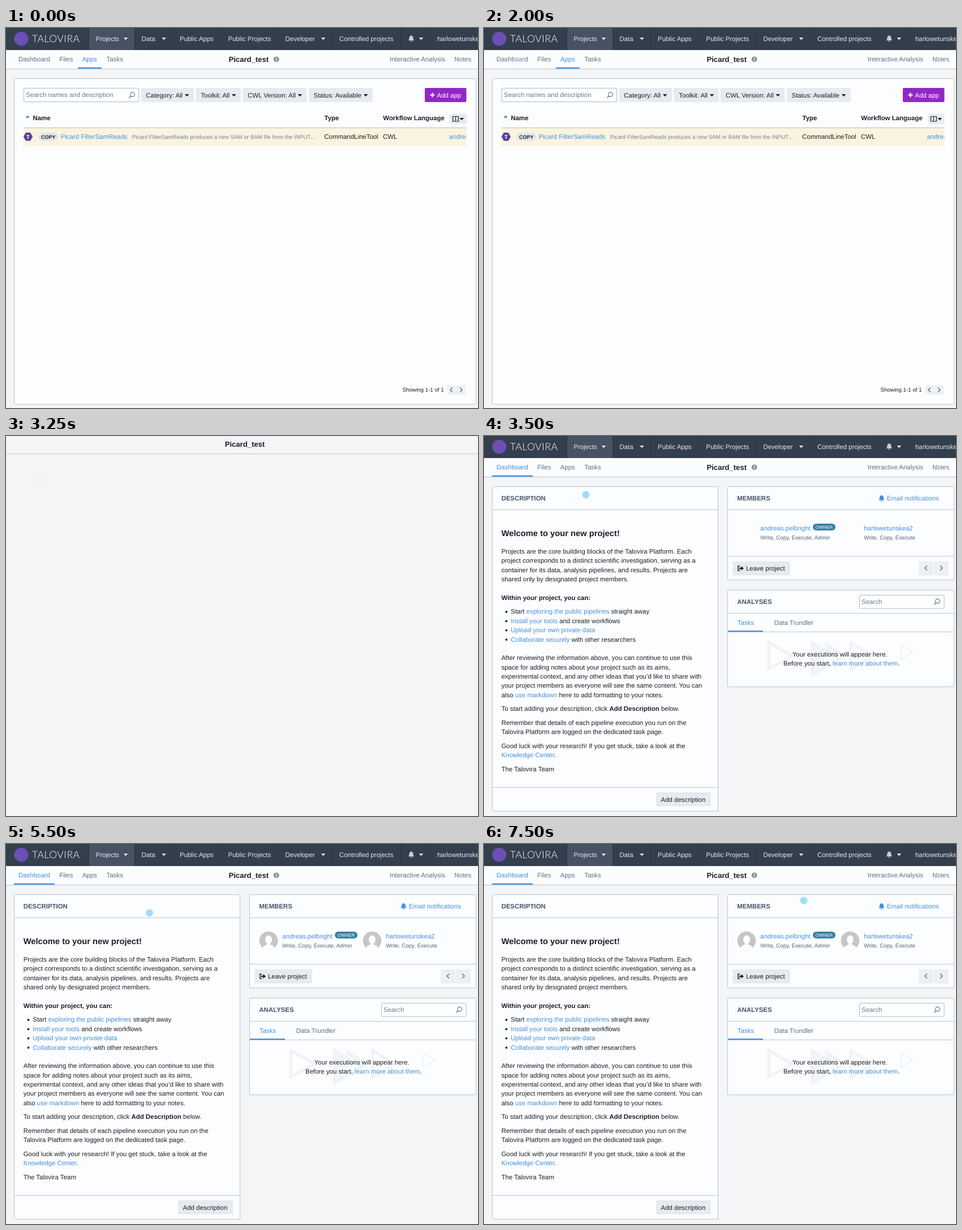
Recreate the animation shown at these times as an HTML page. Size 834x672 px, loop 8000 ms.

```html
<!DOCTYPE html>
<html lang="en">
<head>
<meta charset="utf-8">
<title>Project dashboard</title>
<style>
html, body { margin: 0; width: 100%; height: 100%; overflow: hidden; background: #f3f5f7; }
svg { display: block; width: 834px; height: 672px; }
text { font: 11.45px "Liberation Sans", Arial, sans-serif; fill: #1b1f26; text-rendering: geometricPrecision; white-space: pre; }
.b { font-weight: 700; }
.small { font-size: 9.75px; }
.title { font-size: 13.09px; font-weight: 700; }
.h1 { font-size: 14.73px; font-weight: 700; }
.head { font-weight: 700; fill: #45556a; }
.nav text { fill: #e6e9ed; }
.nav .brand { font: 300 17.6px Lato, sans-serif; letter-spacing: .5px; fill: #fff; }
.tab { fill: #5d7087; }
.link { fill: #4490e0; }
.hint { fill: #6c7885; }
.note { fill: #71809a; }
.white { fill: #fff; }
.card { fill: #fcfdfe; stroke: #b6c6d3; }
.field { fill: #fff; stroke: #a9bccb; }
.btn { fill: #e7ebef; }
.rule { stroke: #b6c6d3; fill: none; }
.bar { fill: #4f97e3; }
.chev { fill: none; stroke: #6f7b88; stroke-width: 1.7; }
.ghost { fill: none; stroke: #f0f3f6; stroke-width: 5; stroke-linejoin: round; }

#apps, #blank, #dash, #chrome, #faces, #dot, #ring { animation: 8s step-end infinite; }
#apps { animation-name: apps; }
#blank { animation-name: blank; }
#chrome { animation-name: chrome; }
#dash { animation-name: dash; }
#faces { animation-name: faces; }
#dot { animation-name: dot; }
#ring { animation-name: ring; }
@keyframes apps { 0% { visibility: visible } 40.625%, 100% { visibility: hidden } }
@keyframes blank { 0% { visibility: hidden } 40.625% { visibility: visible } 43.75%, 100% { visibility: hidden } }
@keyframes chrome { 0% { visibility: visible } 40.625% { visibility: hidden } 43.75%, 100% { visibility: visible } }
@keyframes dash { 0% { visibility: hidden } 43.75%, 100% { visibility: visible } }
@keyframes faces { 0% { visibility: hidden } 50%, 100% { visibility: visible } }
@keyframes dot {
  0% { transform: translate(-30px, -30px) }
  9.375% { transform: translate(112px, 6px) }
  12.5% { transform: translate(130px, 58px) }
  15.625% { transform: translate(130px, 98px) }
  18.75% { transform: translate(99px, 97px) }
  21.875% { transform: translate(78px, 76px) }
  25% { transform: translate(-30px, -30px) }
  43.75% { transform: translate(180px, 104px) }
  46.875% { transform: translate(299px, 127.5px) }
  50% { transform: translate(215px, 104px) }
  53.125% { transform: translate(118.5px, 76.5px) }
  56.25% { transform: translate(150px, 92px) }
  59.375% { transform: translate(208px, 113px) }
  62.5% { transform: translate(244.5px, 121.5px) }
  68.75% { transform: translate(253.5px, 122px) }
  71.875% { transform: translate(335px, 150px) }
  75% { transform: translate(455px, 212px) }
  78.125% { transform: translate(555px, 274px) }
  81.25% { transform: translate(607px, 300px) }
  84.375% { transform: translate(643.5px, 216.5px) }
  87.5% { transform: translate(640px, 150px) }
  90.625% { transform: translate(600px, 112px) }
  93.75%, 100% { transform: translate(565px, 100px) }
}
@keyframes ring {
  0% { transform: translate(-30px, -30px) }
  25% { transform: translate(61px, 60px) }
  28.125% { transform: translate(61px, 62px) }
  31.25% { transform: translate(60px, 66px) }
  34.375% { transform: translate(59px, 72px) }
  37.5% { transform: translate(58px, 77px) }
  43.75%, 100% { transform: translate(-30px, -30px) }
}
</style>
</head>
<body>
<svg viewBox="0 0 834 672">
  <defs>
    <path id="caret" d="M-3.8-2h7.6L0 2.2z"/>
    <path id="bell" d="M0-5.5c.8 0 1 .6 1 1C3-4 3.6-2.300 3.600-.5 3.600 1.800 4.200 2.600 5.200 3.600h-10.400C-4.200 2.600-3.600 1.800-3.600-.5-3.600-2.300-3-4-1-4.500c0-.4.2-1 1-1zM-1.500 4.300h3a1.500 1.500 0 0 1-3 0z"/>
    <g id="lens" fill="none" stroke="#6c7885">
      <circle cx="1" cy="-1" r="3.900" stroke-width="1.200"/>
      <path d="M-1.800 1.800-5 5" stroke-width="1.700"/>
    </g>
    <path id="left" class="chev" d="M2-4-2 0 2 4"/>
    <path id="right" class="chev" d="M-2-4 2 0-2 4"/>
    <clipPath id="round"><circle r="16.500"/></clipPath>
    <g id="face" clip-path="url(#round)">
      <circle r="16.500" fill="#c5c6c8"/>
      <g fill="#fcfdfe">
        <ellipse cy="-2" rx="6" ry="7.500"/>
        <path d="M-11 17C-11 9-7 8.500-3 7V3H3V7C7 8.500 11 9 11 17z"/>
      </g>
    </g>
    <clipPath id="cell"><path d="M770 177h43.500v32H770z"/></clipPath>
  </defs>

  <rect width="834" height="672" fill="#f3f5f7"/>

  <g id="chrome">
    <rect width="834" height="39" fill="#343f4e"/>
    <rect x="147" width="80" height="39" fill="#475364"/>
    <path d="M146.500 0v39M227.500 0v39M295.500 0v39M380.500 0v39M481.500 0v39M576.500 0v39M697.500 0v39M750.500 0v39" stroke="#2b3441"/>
    <circle cx="27" cy="19" r="12.500" fill="#6b4fb3"/>
    <g class="nav">
      <text class="brand" x="46" y="25.300">TALOVIRA</text>
      <text x="158.500" y="22.700" class="white">Projects</text>
      <text x="239.500" y="22.700">Data</text>
      <text x="307" y="22.700">Public Apps</text>
      <text x="392.500" y="22.700">Public Projects</text>
      <text x="493.500" y="22.700">Developer</text>
      <text x="589" y="22.700">Controlled projects</text>
      <text x="762" y="22.700">harlowetunske</text>
    </g>
    <g fill="#e6e9ed">
      <use href="#caret" x="211.500" y="19"/>
      <use href="#caret" x="279" y="19"/>
      <use href="#caret" x="560.500" y="19"/>
      <use href="#caret" x="733.500" y="19"/>
    </g>
    <use href="#bell" x="716" y="18.500" fill="#c9ced5"/>
    <rect y="39" width="834" height="33" fill="#fbfcfd"/>
    <path class="rule" d="M0 72.500h834"/>
    <text class="title" x="393.500" y="59.700">Picard_test</text>
    <circle cx="477.700" cy="55.300" r="4.900" fill="#8a9099"/>
    <path d="M477.700 52v1.600M477.700 54.600v3.600" stroke="#fff" stroke-width="1.500"/>
    <text class="tab" x="94.300" y="59.400">Files</text>
    <text class="tab" x="177.500" y="59.400">Tasks</text>
    <text class="tab" x="678" y="59.400">Interactive Analysis</text>
    <text class="tab" x="792.300" y="59.400">Notes</text>
  </g>

  <g id="apps">
    <text class="tab" x="22" y="59.400">Dashboard</text>
    <text class="link" x="134.700" y="59.400">Apps</text>
    <rect class="bar" x="127" y="69.500" width="42" height="2.500"/>
    <rect class="card" x="14.500" y="89.500" width="816" height="576" rx="1.500"/>

    <rect class="field" x="31.500" y="106.500" width="203" height="24" rx="1.500"/>
    <text class="hint" x="35" y="122.300">Search names and description</text>
    <use href="#lens" x="222.500" y="118.500"/>
    <g class="btn">
      <rect x="239" y="106" width="93" height="25" rx="2"/>
      <rect x="335.500" y="106" width="79.500" height="25" rx="2"/>
      <rect x="418" y="106" width="113.500" height="25" rx="2"/>
      <rect x="535" y="106" width="113" height="25" rx="2"/>
      <rect x="784" y="151.500" width="29.500" height="18.500" rx="2"/>
    </g>
    <text x="247.300" y="122.500">Category: All</text>
    <text x="344.300" y="122.500">Toolkit: All</text>
    <text x="427" y="122.500">CWL Version: All</text>
    <text x="543.500" y="122.500">Status: Available</text>
    <g fill="#1b1f26">
      <use href="#caret" x="319.700" y="119"/>
      <use href="#caret" x="402.700" y="119"/>
      <use href="#caret" x="519.300" y="119"/>
      <use href="#caret" x="635.700" y="119"/>
      <use href="#caret" x="805.300" y="161"/>
    </g>
    <rect x="740" y="106" width="73.500" height="25" rx="2" fill="#9029c3"/>
    <path d="M753.500 114.500v8M749.500 118.500h8" stroke="#fff" stroke-width="2"/>
    <text class="white" x="761.500" y="122.500">Add app</text>

    <path d="M34.500 158.500h7.500l-3.700-4z" fill="#5e7ba0"/>
    <text class="b" x="47.500" y="163">Name</text>
    <text class="b" x="562.500" y="163">Type</text>
    <text class="b" x="666.300" y="163">Workflow Language</text>
    <path d="M789.500 156.500h10v8.500h-10zM794.500 156.500v8.500" fill="none" stroke="#1b1f26" stroke-width="1.200"/>
    <rect x="31" y="177" width="782.500" height="32" fill="#faf3df"/>
    <path d="M31 176.500h782.500" stroke="#b3bfc8"/>

    <path d="M35 185h8l4.200 7.300L43 199.500h-8l-4.200-7.200z" fill="#5f4296"/>
    <text class="small b white" x="39" y="195.800" text-anchor="middle">T</text>
    <rect x="57.500" y="185.500" width="34.500" height="14" rx="7" fill="#e1e5ea"/>
    <text class="b" x="62" y="195.500" style="font-size:9px">COPY</text>
    <text class="link" x="96.700" y="196.200">Picard FilterSamReads</text>
    <text class="note" x="222.700" y="195.700" style="font-size:9.72px">Picard FilterSamReads produces a new SAM or BAM file from the INPUT…</text>
    <text x="562.300" y="196.200">CommandLineTool</text>
    <text x="666" y="196.200">CWL</text>
    <text class="link" x="782.700" y="196.200" clip-path="url(#cell)">andreas.pelbright</text>

    <text class="small" x="700.500" y="643.300">Showing 1-1 of 1</text>
    <rect x="779" y="631.500" width="33.500" height="17" rx="2" fill="#eef1f4"/>
    <use href="#left" x="787" y="640"/>
    <use href="#right" x="804" y="640"/>
  </g>

  <g id="blank">
    <rect width="834" height="672" fill="#f4f5f7"/>
    <path d="M0 31.500h834" stroke="#c3c8cc"/>
    <text class="title" x="386.700" y="18.700">Picard_test</text>
  </g>

  <g id="dash">
    <text class="link" x="22" y="59.400">Dashboard</text>
    <text class="tab" x="134.700" y="59.400">Apps</text>
    <rect class="bar" x="14" y="69.500" width="72" height="2.500"/>

    <rect class="card" x="14.500" y="89.500" width="399" height="574" rx="1.500"/>
    <path class="rule" d="M14.500 130.500h399M14.500 621.500h399"/>
    <text class="head" x="30.700" y="114">DESCRIPTION</text>
    <text class="h1" x="30.700" y="176.500">Welcome to your new project!</text>
    <text x="30.700" y="208">Projects are the core building blocks of the Talovira Platform. Each</text>
    <text x="30.700" y="224.400">project corresponds to a distinct scientific investigation, serving as a</text>
    <text x="30.700" y="240.700">container for its data, analysis pipelines, and results. Projects are</text>
    <text x="30.700" y="257.100">shared only by designated project members.</text>
    <text class="b" x="30.700" y="290">Within your project, you can:</text>
    <g fill="#1b1f26">
      <circle cx="39.500" cy="311" r="1.900"/>
      <circle cx="39.500" cy="327.400" r="1.900"/>
      <circle cx="39.500" cy="343.700" r="1.900"/>
      <circle cx="39.500" cy="360.100" r="1.900"/>
    </g>
    <text x="47.300" y="314.400">Start <tspan class="link">exploring the public pipelines</tspan> straight away</text>
    <text x="47.300" y="330.800"><tspan class="link">Install your tools</tspan> and create workflows</text>
    <text x="47.300" y="347.100"><tspan class="link">Upload your own private data</tspan></text>
    <text x="47.300" y="363.500"><tspan class="link">Collaborate securely</tspan> with other researchers</text>
    <text x="30.700" y="396.300">After reviewing the information above, you can continue to use this</text>
    <text x="30.700" y="412.700">space for adding notes about your project such as its aims,</text>
    <text x="30.700" y="429">experimental context, and any other ideas that you’d like to share with</text>
    <text x="30.700" y="445.400">your project members as everyone will see the same content. You can</text>
    <text x="30.700" y="461.700">also <tspan class="link">use markdown</tspan> here to add formatting to your notes.</text>
    <text x="30.700" y="486.200">To start adding your description, click <tspan class="b">Add Description</tspan> below.</text>
    <text x="30.700" y="510.700">Remember that details of each pipeline execution you run on the</text>
    <text x="30.700" y="527.100">Talovira Platform are logged on the dedicated task page.</text>
    <text x="30.700" y="551.600">Good luck with your research! If you get stuck, take a look at the</text>
    <text x="30.700" y="568"><tspan class="link">Knowledge Center</tspan>.</text>
    <text x="30.700" y="592.500">The Talovira Team</text>
    <rect class="btn" x="304" y="630" width="97" height="25" rx="2"/>
    <text x="312.500" y="646.500">Add description</text>

    <rect class="card" x="430.500" y="89.500" width="400" height="165" rx="1.500"/>
    <path class="rule" d="M430.500 130.500h400M430.500 212.500h400"/>
    <text class="head" x="447.300" y="114">MEMBERS</text>
    <use href="#bell" x="702.500" y="110" fill="#4490e0"/>
    <text class="link" x="711.700" y="114">Email notifications</text>
    <text class="link" x="488.300" y="167.200">andreas.pelbright</text>
    <rect x="581" y="155" width="40" height="12" rx="6" fill="#347fa6"/>
    <text class="white" x="601" y="164" text-anchor="middle" style="font-size:8px">OWNER</text>
    <text class="small" x="488.300" y="183" style="fill:#55657a">Write, Copy, Execute, Admin</text>
    <text class="link" x="671.200" y="167.200">harlowetunskea2</text>
    <text class="small" x="671.200" y="183" style="fill:#55657a">Write, Copy, Execute</text>
    <rect class="btn" x="439.500" y="221.500" width="101.500" height="25" rx="2"/>
    <path d="M452 230h-3v8h3" fill="none" stroke="#1b1f26" stroke-width="1.500"/>
    <path d="M451 232.700h3.500V230l4.500 4-4.500 4v-2.700H451z" fill="#1b1f26"/>
    <text x="463" y="238">Leave project</text>
    <g fill="#eceff3">
      <rect x="768" y="221.500" width="26" height="25" rx="2"/>
      <rect x="795" y="221.500" width="26" height="25" rx="2"/>
    </g>
    <use href="#left" x="781" y="233.500"/>
    <use href="#right" x="808" y="233.500"/>

    <rect class="card" x="430.500" y="272.500" width="400" height="171" rx="1.500"/>
    <path class="rule" d="M430.500 313.500h400M430.500 346.500h400"/>
    <text class="head" x="447.300" y="297">ANALYSES</text>
    <rect class="field" x="663.500" y="281.500" width="149.500" height="23.500" rx="1.500"/>
    <text class="hint" x="667" y="297">Search</text>
    <use href="#lens" x="800.500" y="293"/>
    <text class="link" x="447.700" y="333.700">Tasks</text>
    <text class="tab" x="512.700" y="333.700">Data Trundler</text>
    <rect class="bar" x="431" y="344" width="62" height="2.500"/>
    <g class="ghost">
      <path d="M503 365v47l42-23z"/>
      <path d="M580 365v58l48-29zM602 365l32 24-32 22" fill="#f3f5f8"/>
      <path d="M648 365v48l38-24z"/>
      <path d="M737.500 371v23l21-11.500z" stroke-width="2"/>
    </g>
    <text x="544.700" y="390">Your executions will appear here.</text>
    <text x="529" y="406.400">Before you start, <tspan class="link">learn more about them</tspan>.</text>
  </g>

  <g id="faces">
    <use href="#face" x="464" y="171"/>
    <use href="#face" x="647" y="171"/>
  </g>

  <circle id="ring" r="9" fill="#fff" fill-opacity=".15" stroke="#e8eaec"/>
  <circle id="dot" r="6.500" fill="#a1dcfa"/>
</svg>
</body>
</html>
```
